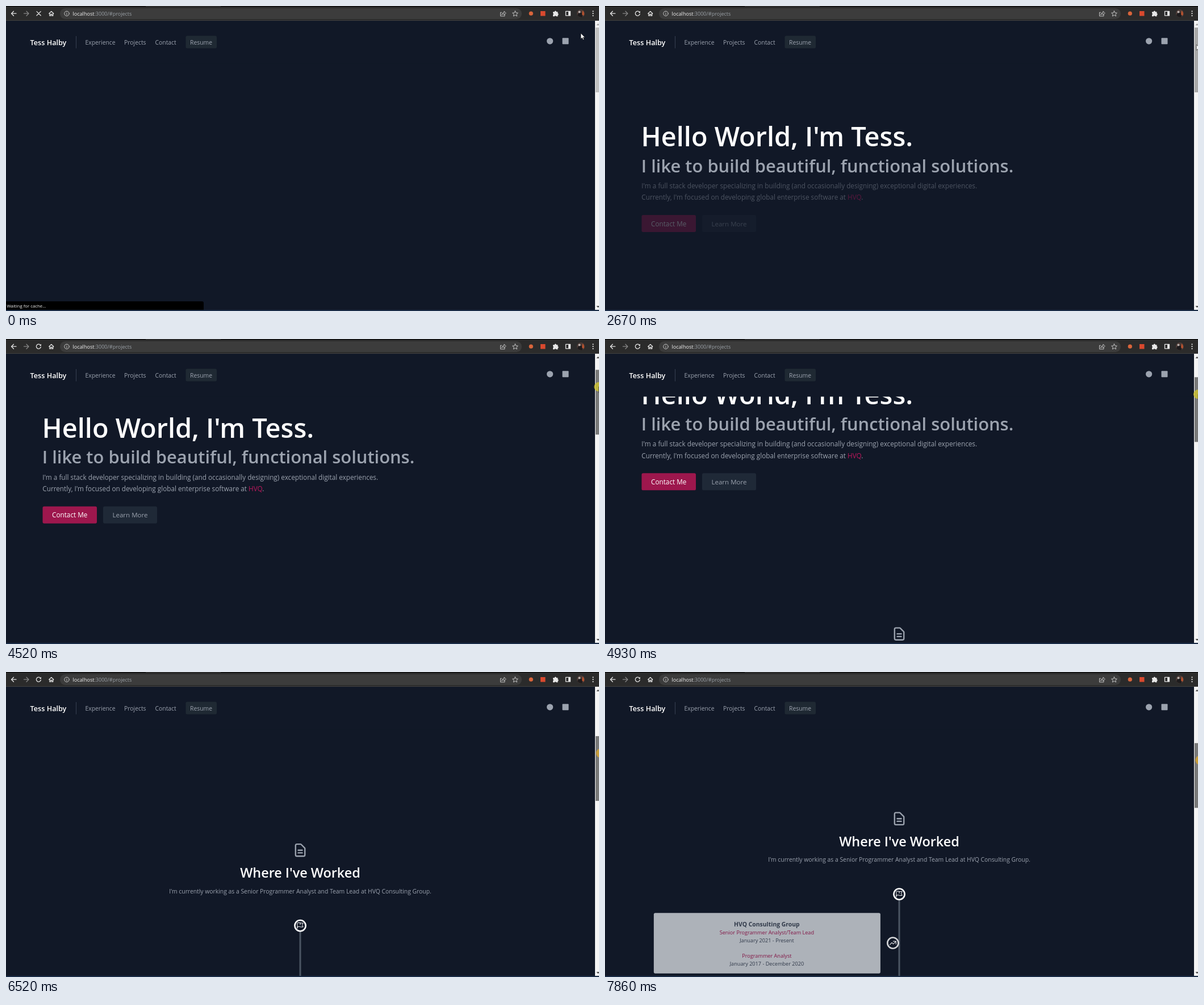
Recreate the animation shown at these times as an HTML page. Size 1044 by 537 pixels, loop 7990 ms.

```html
<!DOCTYPE html>
<html lang="en">
<head>
<meta charset="utf-8">
<title>Portfolio</title>
<style>
  html, body { margin: 0; width: 100%; height: 100%; overflow: hidden; background: #111827; }
  svg { display: block; width: 100%; height: 100%; font-family: "Open Sans", "Noto Sans", sans-serif; }
  .nav { font-size: 10.37px; fill: #9ca3af; }
  .body { font-size: 11.75px; fill: #9ca3af; }
  .bold { font-weight: 600; fill: #fff; }
  .card { font-size: 9.15px; font-weight: 500; fill: #374151; text-anchor: middle; }
  .card .role { fill: #9d174d; }
  .line { fill: none; stroke-linecap: round; stroke-linejoin: round; }
  .chrome { stroke: #e4e4e4; stroke-width: 1.3; }
</style>
</head>
<body>
<svg viewBox="0 0 1044 537">
  <rect width="1044" height="537" fill="#111827"/>

  <!-- Scrolling page -->
  <g id="page">
    <text id="title" class="bold" x="63.5" y="247" font-size="46.9">Hello World, I'm Tess.</text>
    <text id="lead" class="bold" x="63.8" y="292.7" font-size="30.9" style="fill:#9ca3af">I like to build beautiful, functional solutions.</text>
    <g id="intro" class="body">
      <text x="64.3" y="321">I'm a full stack developer specializing in building (and occasionally designing) exceptional digital experiences.</text>
      <text x="64.3" y="341.2">Currently, I'm focused on developing global enterprise software at <tspan fill="#be185d">HVQ</tspan>.</text>
    </g>
    <g id="buttons" class="body" text-anchor="middle">
      <rect x="64.5" y="368" width="95.5" height="30" rx="2.7" fill="#9d174d"/>
      <text x="112.2" y="387.6" fill="#fff" font-weight="500">Contact Me</text>
      <rect x="171" y="368" width="95" height="30" rx="2.7" fill="#1f2937"/>
      <text x="218.5" y="387.6" font-size="11.55">Learn More</text>
    </g>

    <g transform="translate(503.9 636.7) scale(1.175)" class="line" stroke="#9ca3af" stroke-width="2">
      <path d="M9 12h6m-6 4h6m2 5H7a2 2 0 01-2-2V5a2 2 0 012-2h5.586a1 1 0 01.707.293l5.414 5.414a1 1 0 01.293.707V19a2 2 0 01-2 2z"/>
    </g>
    <text class="bold" x="518" y="699.3" font-size="23.4" text-anchor="middle">Where I've Worked</text>
    <text class="nav" x="518" y="727" text-anchor="middle">I'm currently working as a Senior Programmer Analyst and Team Lead at HVQ Consulting Group.</text>

    <rect x="516.5" y="790" width="3" height="420" fill="#4b5563"/>
    <g transform="translate(518 783.7)">
      <circle r="9.6" fill="#111827" stroke="#fff" stroke-width="2.6"/>
      <path class="line" stroke="#fff" stroke-width="1.7" transform="scale(.57) translate(-12 -12)"
        d="M3 21v-4m0 0V5a2 2 0 012-2h6.5l1 1H21l-3 6 3 6h-8.5l-1-1H5a2 2 0 00-2 2zm9-13.5V9"/>
    </g>
    <g id="job">
      <rect x="97" y="816.7" width="399" height="106.5" rx="2.7" fill="#d1d5db"/>
      <g class="card">
        <text x="296" y="840.4" font-size="10.4" font-weight="700">HVQ Consulting Group</text>
        <text x="296" y="855" class="role">Senior Programmer Analyst/Team Lead</text>
        <text x="296" y="868.7">January 2021 - Present</text>
        <text x="296" y="896" class="role">Programmer Analyst</text>
        <text x="296" y="909.7">January 2017 - December 2020</text>
      </g>
      <g transform="translate(518 869.7)">
        <circle r="9.6" fill="#111827" stroke="#fff" stroke-width="2.6"/>
        <path class="line" stroke="#fff" stroke-width="2" transform="scale(.6) translate(-12 -12)" d="M13 7h8m0 0v8m0-8l-8 8-4-4-6 6"/>
      </g>
    </g>
  </g>

  <!-- Site header -->
  <rect y="26" width="1037" height="75.5" fill="#111827"/>
  <text class="bold" x="42.5" y="68.5" font-size="12.65">Tess Halby</text>
  <path d="M123.5 53v21.5" stroke="#374151"/>
  <rect x="316.5" y="52.5" width="54.5" height="22" rx="2.7" fill="#1f2933"/>
  <g class="nav">
    <text x="139.5" y="67.8">Experience</text>
    <text x="208" y="67.8">Projects</text>
    <text x="262.5" y="67.8">Contact</text>
    <text x="324" y="67.8">Resume</text>
    <circle cx="957.6" cy="61.8" r="5.6"/>
    <rect x="979.5" y="56.3" width="11" height="11" rx="1"/>
  </g>

  <!-- Browser window -->
  <rect y="535" width="1044" height="2" fill="#1b2d47"/>
  <g id="status">
    <path d="M0 520h345a3 3 0 013 3v12H0z" fill="#000"/>
    <text x="1.5" y="530.8" font-size="7.8" fill="#f0f0f0">Waiting for cache...</text>
  </g>
  <rect width="1044" height="26" fill="#2b2b2b"/>
  <rect width="1044" height="1" fill="#000"/>
  <rect x="246" width="132" height="1" fill="#2b2b2b"/>
  <rect y="25" width="1044" height="1" fill="#404040"/>
  <rect x="95" y="4" width="813" height="19" rx="9.5" fill="#3c3c3c"/>
  <g class="line chrome">
    <path d="M18 13.2H9.8M13.5 9.2l-4 4 4 4"/>
    <path d="M31.5 13.2h8.2M36 9.2l4 4-4 4" stroke="#858585"/>
    <path id="stop" d="M54 9.6l7.2 7.2M61.2 9.6L54 16.8"/>
    <g id="reload"><path d="M61.3 14a4 4 0 11-1-3.6l1 1"/><path d="M62 8.8v3.1h-3.1z" fill="#e4e4e4" stroke="none"/></g>
    <path d="M75.8 13.2l4-3.8 4 3.8M76.9 12.8v4.4h1.9v-2.9h2v2.9h1.9v-4.4"/>
    <g stroke="#c4c4c4" stroke-width="1">
      <circle cx="107" cy="13.3" r="4.2"/><path d="M107 13v2.4M107 11v.1"/>
      <path d="M872.5 11.3h-2v6.5h7.5v-2M872.8 15.3c.4-2.6 2-3.7 4.2-3.8V9.2l3.2 3.4-3.2 3.3v-2.2c-2 0-3.2.4-4.2 1.6z"/>
      <path d="M896.5 8.7l1.4 3.2 3.5.3-2.6 2.3.8 3.4-3.1-1.8-3.1 1.8.8-3.4-2.6-2.3 3.5-.3z"/>
    </g>
    <rect x="985.5" y="9.3" width="8" height="7.6"/>
  </g>
  <text x="117.5" y="17" font-size="9.05" fill="#9aa0a6"><tspan fill="#f0f0f0">localhost</tspan>:3000/#projects</text>
  <circle cx="924.3" cy="13.2" r="3.6" fill="#d9653b"/>
  <rect x="941" y="9" width="8.5" height="8.5" fill="#d9492e"/>
  <path d="M963 10.2h2.7a1.6 1.6 0 013.2 0h2.6v2.7a1.6 1.6 0 010 3.1v2.2h-2.8a1.6 1.6 0 00-3 0H963v-2.8a1.5 1.5 0 000-2.7z" fill="#e8e8e8"/>
  <path d="M990 9h4v8h-4z" fill="#e4e4e4"/>
  <circle cx="1012" cy="13" r="7" fill="#4b3a36"/>
  <path d="M1006 16a7 7 0 009 3.2l-1-7-5-1z" fill="#1d1b1d"/>
  <path d="M1015 8a7 7 0 012 9l-3-2z" fill="#b8532f"/>
  <circle cx="1009.5" cy="10.5" r="2" fill="#b9b0ac"/>
  <g fill="#e4e4e4"><circle cx="1033.5" cy="9.3" r="1.1"/><circle cx="1033.5" cy="13.2" r="1.1"/><circle cx="1033.5" cy="17.1" r="1.1"/></g>

  <!-- Scrollbar and pointer -->
  <rect x="1037" y="26" width="7" height="509" fill="#f4f4f4"/>
  <path id="up" d="M1039.5 34l2.8-3.2 2.8 3.2z"/>
  <path d="M1039.5 528l2.8 3.2 2.8-3.2z" fill="#505050"/>
  <rect id="thumb" x="1038" width="6" height="114"/>
  <circle id="press" r="8.2"/>
  <path id="arrow" d="M0 0v10l2.4-2.2 1.6 3.6 1.6-.7-1.6-3.5h3.2z" fill="#fff" stroke="#111" stroke-width=".6"/>
</svg>
<script>
const LOOP = 7990, STEP = LOOP / 60;
const $ = id => document.getElementById(id);
const set = (id, attrs) => { for (const k in attrs) $(id).setAttribute(k, attrs[k]); };

// Linear track through [time, value] points, held at both ends.
function track(points, t) {
  if (t <= points[0][0]) return points[0][1];
  for (let i = 1; i < points.length; i++) {
    const [t0, a] = points[i - 1], [t1, b] = points[i];
    if (t < t1) return a + (b - a) * (t - t0) / (t1 - t0);
  }
  return points.at(-1)[1];
}

function fade(t, start, end) {
  const u = Math.min(1, Math.max(0, (t - start) / (end - start)));
  return u * u * (3 - 2 * u);
}

const thumbTrack = [[4000, 38], [4520, 54], [4790, 64], [5190, 73.5], [5460, 83], [5590, 86.2],
  [6120, 99.5], [6520, 112.8], [6790, 118.5], [7190, 122.5], [7720, 122.5], [7860, 125.3]];
const pointerX = [[0, 1012], [400, 1031], [800, 1041], [3990, 1041.5], [4520, 1043.5],
  [5460, 1045], [6520, 1047], [7860, 1047.5]];
const pointerY = [[0, 48], [400, 63], [800, 68]];
const slide = [[6900, -60], [7190, -49], [7720, -16], [7860, -11]];

function draw(t) {
  const top = track(thumbTrack, t), drag = top - 38;
  const pressed = t >= 3720;
  const x = track(pointerX, t), y = track(pointerY, t) + drag;

  set('page', { transform: `translate(0 ${-drag * 4.5})` });
  set('title', { opacity: fade(t, 930, 2020) });
  set('lead', { opacity: fade(t, 1060, 2250) });
  set('intro', { opacity: fade(t, 2150, 3300) });
  set('buttons', { opacity: fade(t, 2200, 3500) });

  const dx = track(slide, t);
  set('job', { transform: `translate(${dx} 0)`, opacity: 1 + dx / 60 });

  const loading = t < 260;
  set('stop', { opacity: +loading });
  set('reload', { opacity: +!loading });
  set('status', { opacity: 1 - fade(t, 530, 930) });

  set('thumb', { y: top, fill: pressed ? '#787878' : t >= 660 ? '#a8a8a8' : '#c1c1c1' });
  set('up', { fill: drag > 0 ? '#505050' : '#a3a3a3' });
  set('press', { cx: x, cy: y, opacity: pressed ? .78 : 0, fill: t < 5000 ? '#d2c62d' : '#dda62a' });
  set('arrow', { transform: `translate(${x} ${y})` });
}

const begin = performance.now();
function tick() {
  const t = (performance.now() - begin) % LOOP;
  draw(Math.min(59, Math.floor((t + 8) / STEP)) * STEP);
  requestAnimationFrame(tick);
}
tick();
</script>
</body>
</html>
```
